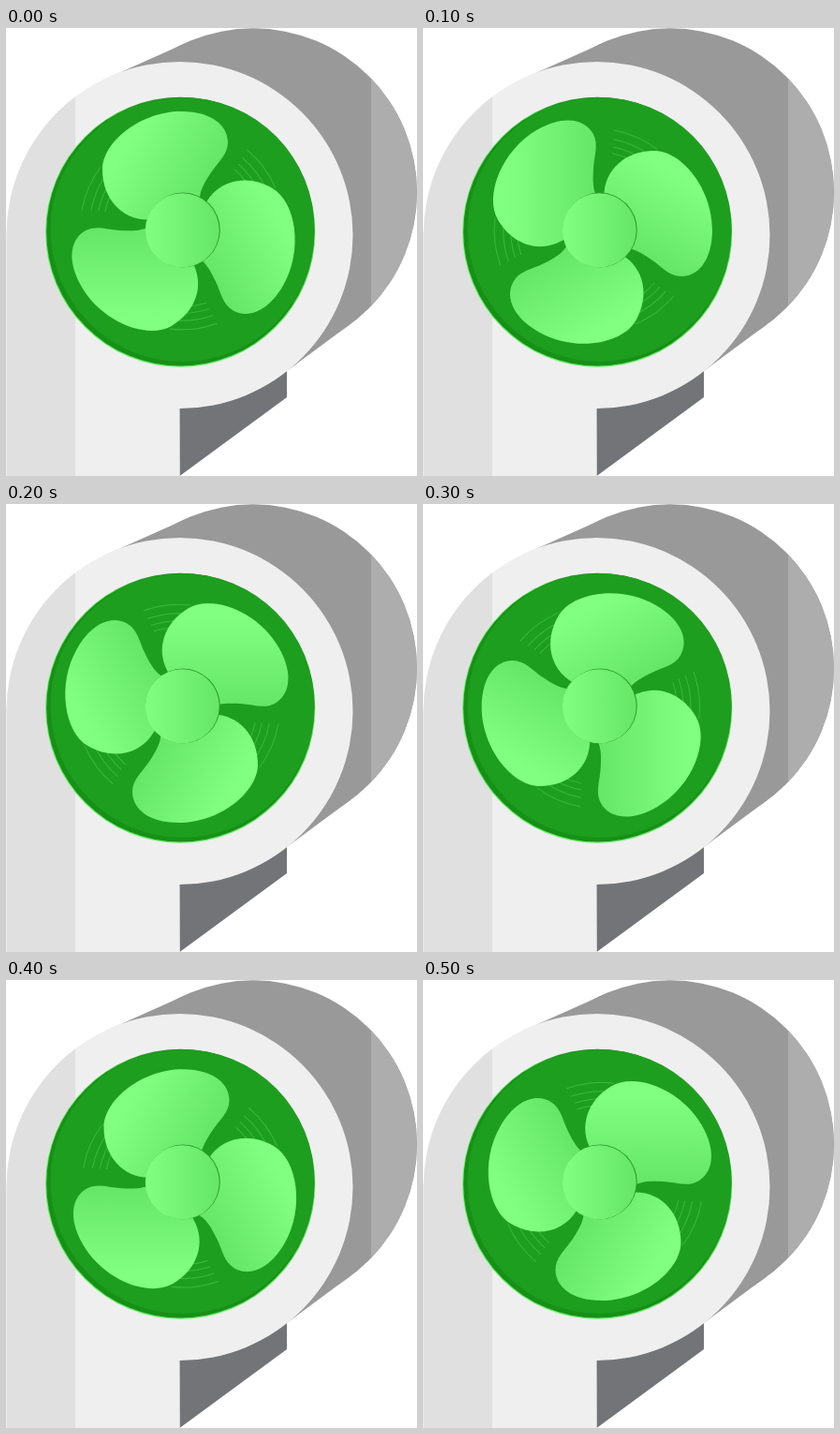
Recreate the animation shown at these times as an HTML page. Size 439 px wide and 478 px high, loop 0.6 s.

```html
<!DOCTYPE html>
<html lang="en">
<head>
<meta charset="utf-8">
<title>Fan</title>
<style>
html, body { margin: 0; width: 100%; height: 100%; overflow: hidden; background: #fff; }
svg { display: block; width: 100%; height: 100%; }
</style>
</head>
<body>
<svg viewBox="0 0 439 478">
  <defs>
    <linearGradient id="bladeFill" gradientUnits="userSpaceOnUse" x1="-82" y1="-47" x2="0" y2="0">
      <stop stop-color="#80ff80"/><stop offset="1" stop-color="#66e666"/>
    </linearGradient>
    <linearGradient id="hubFill">
      <stop stop-color="#80ff80"/><stop offset="1" stop-color="#66e666"/>
    </linearGradient>
    <linearGradient id="rimFill" x1=".3" y1="1" x2=".75" y2="0">
      <stop stop-color="#66f066"/><stop offset=".75" stop-color="#4fd84f"/><stop offset="1" stop-color="#0a300a"/>
    </linearGradient>
    <clipPath id="left"><path d="M0 0H74V478H0Z"/></clipPath>
    <clipPath id="right"><path d="M390 0H439V478H390Z"/></clipPath>
    <path id="body" d="M.5 478V221A185 185 0 1 1 185.5 406V478Z"/>
    <circle id="drum" cx="264" cy="175.3" r="175"/>
    <g id="blade">
      <g id="arcs" fill="none" stroke="#66e666" stroke-opacity=".38"/>
      <path fill="url(#bladeFill)" d="M0 0L-36 -8.7C-65 -8.5 -85 -32 -85 -62
        C-85 -92 -44 -124.3 -1 -124.3C34 -124.3 49 -107.5 49 -91.5
        C49 -78 39 -71 31 -59S18 -38 19 -28Z"/>
    </g>
  </defs>

  <use href="#drum" fill="#999"/>
  <path fill="#999" d="M107 54L190 17L368 315.8L300 366Z"/>
  <use href="#drum" fill="#adadad" clip-path="url(#right)"/>
  <path fill="#737477" d="M185 380L300 360V394L185.5 478Z"/>
  <use href="#body" fill="#efefef"/>
  <use href="#body" fill="#e0e0e0" clip-path="url(#left)"/>

  <circle cx="186.2" cy="217.8" r="144" fill="url(#rimFill)"/>
  <circle cx="186.2" cy="217.5" r="143" fill="#179017"/>
  <circle cx="188.6" cy="215" r="141" fill="#1e9e1e"/>

  <g id="fan">
    <use href="#blade"/>
    <use href="#blade" transform="rotate(120)"/>
    <use href="#blade" transform="rotate(240)"/>
  </g>

  <circle cx="189" cy="215.4" r="39.8" fill="#2a9a2a"/>
  <circle cx="188.3" cy="215.8" r="39.5" fill="url(#hubFill)"/>
</svg>
<script>
// Each 100 ms pose: hub x, hub y, angle; the rotor wobbles as it spins.
const poses = [
  [188, 213.3, 0], [184.7, 216, -30], [184, 215.7, -60],
  [187, 216, -90], [189.5, 219.5, -120], [190.5, 217.7, -180]
];
const fan = document.getElementById('fan');

// Speed lines trailing behind each blade
const polar = (r, deg) => {
  const a = deg * Math.PI / 180;
  return `${(r * Math.cos(a)).toFixed(1)} ${(r * Math.sin(a)).toFixed(1)}`;
};
for (const r of [108.5, 99, 91, 84]) {
  const line = document.createElementNS('http://www.w3.org/2000/svg', 'path');
  line.setAttribute('d', `M${polar(r, 190 + (108.5 - r) / 12)}A${r} ${r} 0 0 1 ${polar(r, 217)}`);
  document.getElementById('arcs').append(line);
}

function draw() {
  const [x, y, angle] = poses[Math.floor(performance.now() % 600 / 100)];
  fan.setAttribute('transform', `translate(${x} ${y}) rotate(${angle})`);
  requestAnimationFrame(draw);
}
draw();
</script>
</body>
</html>
```
